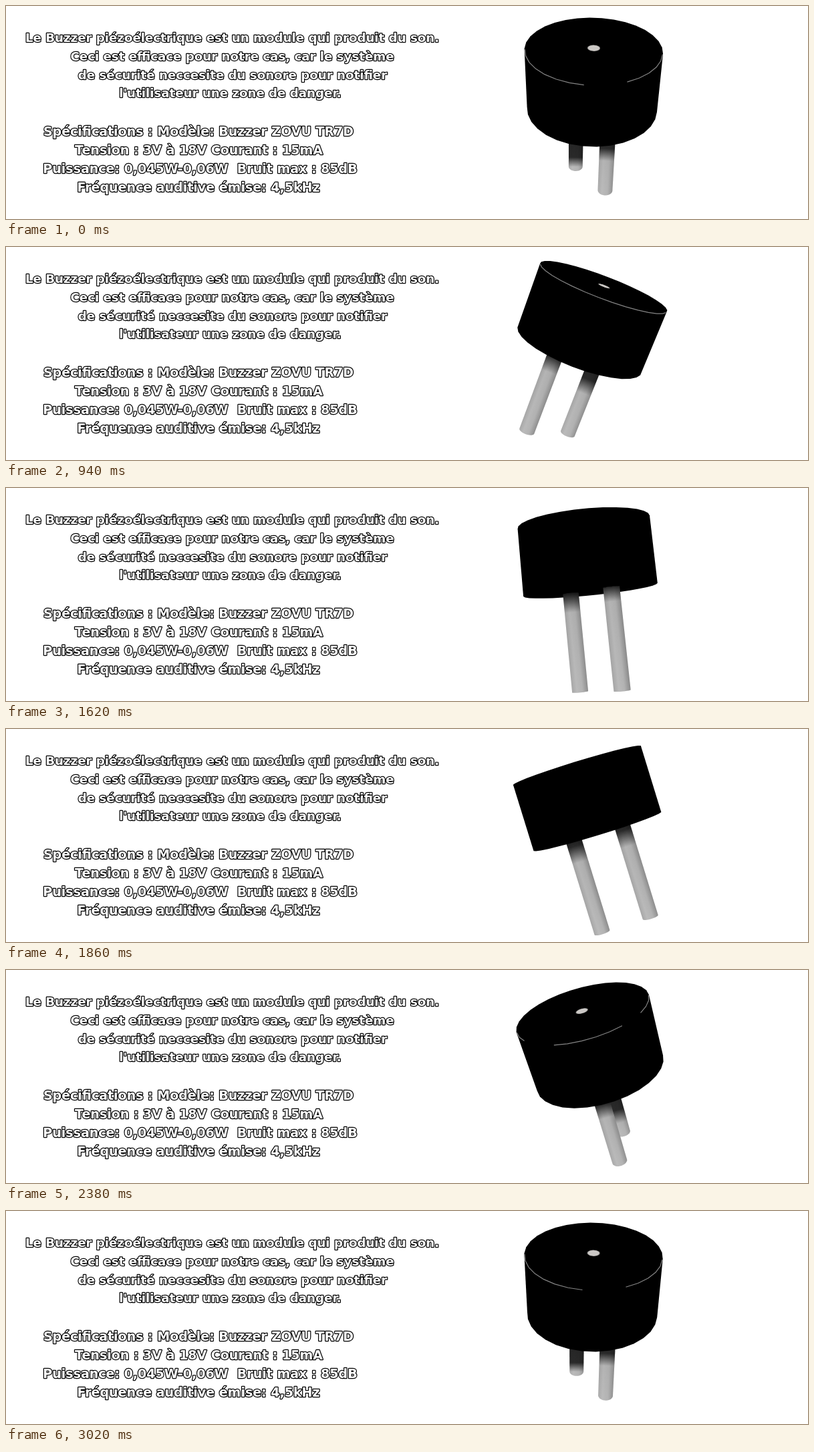
An HTML page with a canvas for the animation above (3.04 s loop, 1200 px wide and 320 px high).

```html
<!DOCTYPE html>
<html lang="fr">
<head>
<meta charset="utf-8">
<title>Buzzer piézoélectrique</title>
<style>
  html, body { margin: 0; width: 100%; height: 100%; overflow: hidden; background: #fff; }
  canvas, svg { position: absolute; left: 0; top: 0; width: 1200px; height: 320px; }
  text {
    font: bold 18.2px "DejaVu Sans", sans-serif;
    text-anchor: middle;
    white-space: pre;
    fill: #fff;
    stroke: #000;
    stroke-width: 2.4px;
    stroke-linejoin: round;
    paint-order: stroke;
  }
  .specs text { font-size: 19px; }
</style>
</head>
<body>
<canvas id="stage" width="1200" height="320"></canvas>
<svg viewBox="0 0 1200 320">
  <text x="338.5" y="53.5">Le Buzzer piézoélectrique est un module qui produit du son.</text>
  <text x="338.5" y="81.5">Ceci est efficace pour notre cas, car le système</text>
  <text x="339" y="109.5">de sécurité neccesite du sonore pour notifier</text>
  <text x="335.5" y="137">l'utilisateur une zone de danger.</text>
  <g class="specs">
    <text x="288" y="195">Spécifications : Modèle: Buzzer ZOVU TR7D</text>
    <text x="288.5" y="223">Tension : 3V à 18V Courant : 15mA</text>
    <text x="290.5" y="250.5">Puissance: 0,045W-0,06W  Bruit max : 85dB</text>
    <text x="288" y="278.5">Fréquence auditive émise: 4,5kHz</text>
  </g>
</svg>
<script>
const ctx = document.getElementById('stage').getContext('2d');
const RAD = Math.PI / 180;
const LOOP = 3040, STEP = 40, TURN_STEPS = 78.4;
const TILT = 20.5 * RAD, ELEVATION = 12 * RAD, DISTANCE = 850;
const BODY = { radius: 99.5, top: 58, bottom: -44, sides: 32 };
const PIN = { radius: 12, end: -192, offset: 38, angle: 53 * RAD };
const LIGHT = [0, Math.sin(17 * RAD), Math.cos(17 * RAD)];
const RIM_GAPS = [[84, 14], [0, 8]];   // centre and half width, degrees

const dot = (p, q) => p[0] * q[0] + p[1] * q[1] + p[2] * q[2];
const towardCamera = (normal, p) => dot(normal, [-p[0], -p[1], DISTANCE - p[2]]) > 0;

// Model (a, height, b) to view space: x right, y up, z toward the viewer.
function makeView(phi) {
  const [ct, st, cp, sp, ce, se] = [TILT, phi, ELEVATION].flatMap(v => [Math.cos(v), Math.sin(v)]);
  return (a, h, b) => {
    const y = h * ct - b * st, z = h * st + b * ct;
    const depth = z * cp - a * sp;
    return [a * cp + z * sp, y * ce - depth * se, y * se + depth * ce];
  };
}

function makeProjection(phi) {
  const drift = Math.cos(phi);
  return ([x, y, z]) => {
    const s = DISTANCE / (DISTANCE - z);
    return [874 + 4 * drift + s * x, 112 + 2 * drift - s * y];
  };
}

function hull(points) {
  points = [...points].sort((p, q) => p[0] - q[0] || p[1] - q[1]);
  const half = list => {
    const out = [];
    for (const p of list) {
      while (out.length > 1) {
        const [a, b] = out.slice(-2);
        if ((b[0] - a[0]) * (p[1] - a[1]) - (b[1] - a[1]) * (p[0] - a[0]) > 0) break;
        out.pop();
      }
      out.push(p);
    }
    return out.slice(0, -1);
  };
  return half(points).concat(half(points.reverse()));
}

function trace(points) {
  ctx.beginPath();
  points.forEach(p => ctx.lineTo(...p));
  ctx.closePath();
}

function fill(points, style) {
  trace(points);
  ctx.fillStyle = style;
  ctx.fill();
}

function gradient(from, to, stops) {
  const g = ctx.createLinearGradient(...from, ...to);
  stops.forEach(([at, color]) => g.addColorStop(Math.min(1, Math.max(0, at)), color));
  return g;
}

function draw(step) {
  const t = step / TURN_STEPS;
  const phi = 2 * Math.PI * t * t * (3 - 2 * t) + 4 * RAD;
  const view = makeView(phi), project = makeProjection(phi);
  const at = (a, h, b) => project(view(a, h, b));
  const ring = (radius, h, a = 0, b = 0) =>
    Array.from({ length: BODY.sides }, (_, i) => {
      const angle = 2 * Math.PI * i / BODY.sides;
      return view(a + radius * Math.cos(angle), h, b + radius * Math.sin(angle));
    });
  const up = view(0, 1, 0);
  const [la, lu, lb] = [view(1, 0, 0), up, view(0, 0, 1)].map(axis => dot(LIGHT, axis));

  // Length of the shadow the body casts down a pin standing at (a, b).
  function shadowLength(a, b) {
    if (lu <= 0) return 0;
    const k = la * la + lb * lb, m = a * la + b * lb;
    const reach = (Math.sqrt(m * m + k * (BODY.radius ** 2 - a * a - b * b)) - m) / k;
    return reach * lu;
  }

  const pinSurface = ([a, b]) =>
    [...ring(PIN.radius, BODY.bottom, a, b), ...ring(PIN.radius, PIN.end, a, b)];
  const pinDepth = ([a, b]) => view(a, 0, b)[2];

  function drawPin([a, b]) {
    const shape = hull(pinSurface([a, b]).map(project));
    const from = at(a, BODY.bottom, b), to = at(a, PIN.end, b);
    const length = BODY.bottom - PIN.end, shade = shadowLength(a, b);
    fill(shape, gradient(from, to, [
      [0, '#1a1a1a'],
      [(shade - 16) / length, '#2a2a2a'],
      [(shade + 9) / length, '#b4b4b4'],
      [1, '#bababa']
    ]));
    const dx = to[0] - from[0], dy = to[1] - from[1], n = 12 / Math.hypot(dx, dy);
    const side = [dy * n, -dx * n];
    fill(shape, gradient([to[0] - side[0], to[1] - side[1]], [to[0] + side[0], to[1] + side[1]], [
      [0, 'rgba(0,0,0,.1)'], [.3, 'rgba(0,0,0,0)'], [.65, 'rgba(0,0,0,.04)'], [1, 'rgba(0,0,0,.24)']
    ]));
  }

  // The near pin's shadow, slid along the light to the far pin's depth.
  function drawPinShadow(far, near) {
    const slide = (pinDepth(near) - pinDepth(far)) / LIGHT[2];
    const cast = pinSurface(near).map(p => project(p.map((v, i) => v - slide * LIGHT[i])));
    ctx.save();
    trace(hull(pinSurface(far).map(project)));
    ctx.clip();
    fill(hull(cast), 'rgba(0,0,0,.65)');
    ctx.restore();
  }

  function drawPins() {
    const [far, near] = [1, -1]
      .map(s => [s * PIN.offset * Math.cos(PIN.angle), s * PIN.offset * Math.sin(PIN.angle)])
      .sort((p, q) => pinDepth(p) - pinDepth(q));
    drawPin(far);
    drawPinShadow(far, near);
    drawPin(near);
  }

  function drawRim() {
    const size = 360 / BODY.sides;
    ctx.strokeStyle = '#858585';
    ctx.lineWidth = 1.2;
    ctx.beginPath();
    for (let i = 0; i < BODY.sides; i++) {
      const middle = (i + .5) * size;
      const inGap = RIM_GAPS.some(([c, w]) => Math.abs((middle - c + 540) % 360 - 180) < w);
      const c = Math.cos(middle * RAD), s = Math.sin(middle * RAD);
      const point = view(BODY.radius * c, BODY.top, BODY.radius * s);
      if (inGap || !towardCamera(view(c, 0, s), point)) continue;
      for (const [j, angle] of [i * size, (i + 1) * size].entries()) {
        const r = BODY.radius - .6;
        const p = at(r * Math.cos(angle * RAD), BODY.top - .6, r * Math.sin(angle * RAD));
        j ? ctx.lineTo(...p) : ctx.moveTo(...p);
      }
    }
    ctx.stroke();
  }

  function drawBody() {
    const rims = [...ring(BODY.radius, BODY.top), ...ring(BODY.radius, BODY.bottom)];
    fill(hull(rims.map(project)), '#000');
    if (!towardCamera(up, view(0, BODY.top, 0))) return;
    drawRim();
    fill(ring(9.2, BODY.top).map(project), '#8c8a88');
    fill(ring(8.2, BODY.top).map(project), '#cbc8c5');
  }

  ctx.clearRect(0, 0, 1200, 320);
  const seenFromBelow = !towardCamera(up, view(0, BODY.bottom, 0));
  (seenFromBelow ? [drawBody, drawPins] : [drawPins, drawBody]).forEach(paint => paint());
}

const start = performance.now();
function tick() {
  const time = (performance.now() - start) % LOOP;
  draw(Math.floor((time + STEP / 2) / STEP));
  requestAnimationFrame(tick);
}
tick();
</script>
</body>
</html>
```
